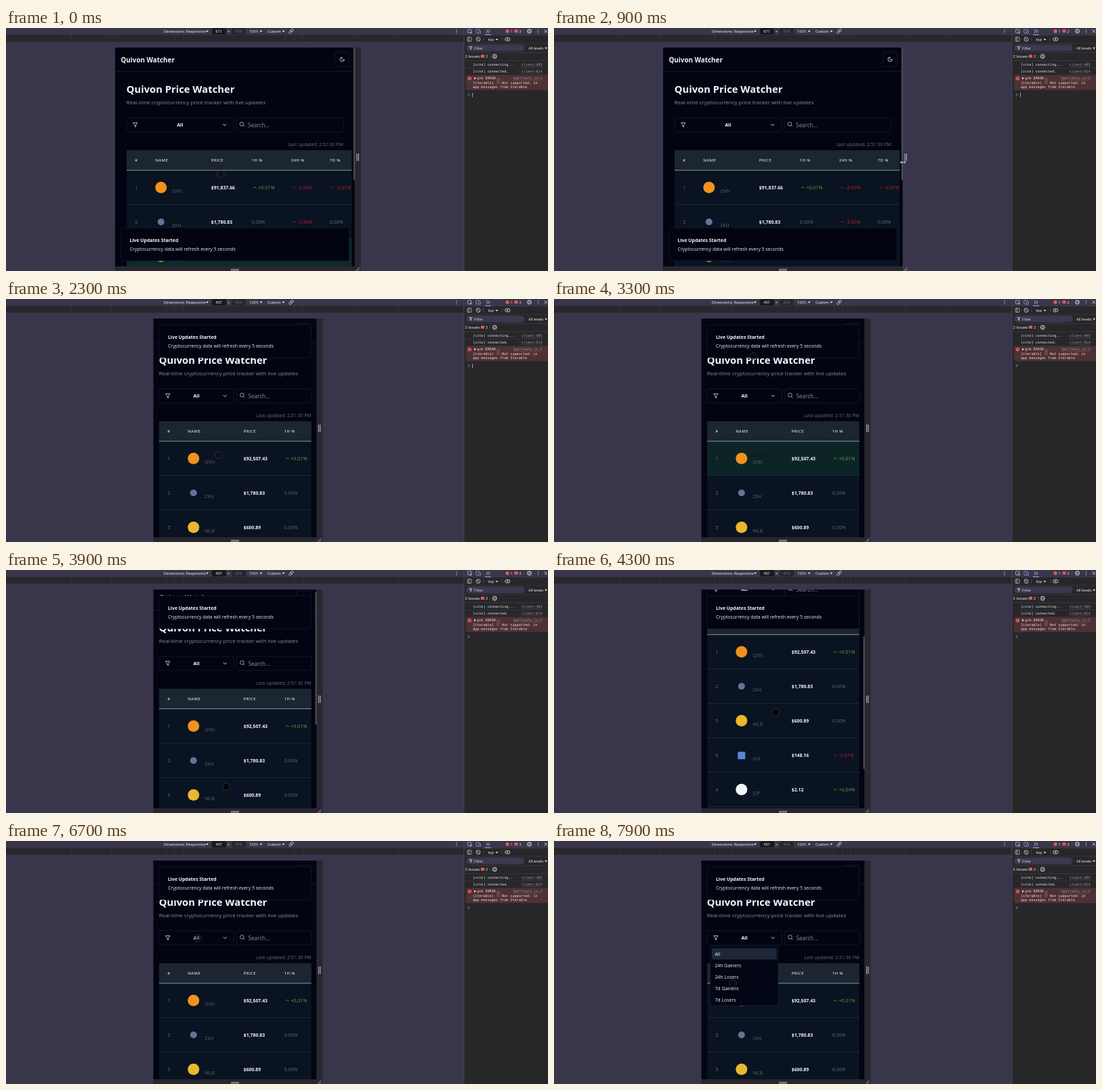
Write an HTML page with a canvas that moves like this. It is 800 by 360 pixels and loops after 8 s.

```html
<!DOCTYPE html>
<html lang="en">
<head>
<meta charset="utf-8">
<title>Responsive preview</title>
<style>
html, body { margin: 0; width: 100%; height: 100%; overflow: hidden; background: #39354a; }
canvas { display: block; width: 800px; height: 360px; }
</style>
</head>
<body>
<canvas id="stage"></canvas>
<script>
const LOOP = 8000, SCALE = 0.527, MID = 337.8, TOP = 29, BOTTOM = 353;
const SANS = '"Open Sans", "Noto Sans", sans-serif';
const MONO = '"DejaVu Sans Mono", "Noto Sans Mono", monospace';
const UI = 'Roboto, "Open Sans", sans-serif';
const GREEN = '#5fa632', RED = '#bd1b2a', DIM = '#626973', PAGE = '#020412';
const BAR = '#39354a', DARK = '#27272a';

const canvas = document.getElementById('stage');
const c = canvas.getContext('2d');
const dpr = window.devicePixelRatio || 1;
canvas.width = 800 * dpr;
canvas.height = 360 * dpr;

const moon = new Path2D('M12 3a6 6 0 0 0 9 9 9 9 0 1 1-9-9Z');

const coins = [
  { rank: 1, name: 'Qelvane', sym: 'QVN', price: '$91,837.66', color: '#f0921e', r: 8.5, pct: [0.01, -2.06, -0.01] },
  { rank: 2, name: 'Zorkhem', sym: 'ZKH', price: '$1,780.83', color: '#6d6f98', r: 5, pct: [0, -3, 0] },
  { rank: 5, name: 'WLB', sym: 'WLB', price: '$600.89', color: '#e8b92e', r: 8.5, pct: [0, -2.87, 0] },
  { rank: 6, name: 'Vulmera', sym: 'VUL', price: '$148.16', color: '#5b86d8', square: 11, pct: [-0.01, -1.94, 0] },
  { rank: 4, name: 'JQP', sym: 'JQP', price: '$2.12', color: '#f4f5f6', r: 8.5, pct: [0.04, -1.62, 0] },
  { rank: 3, name: 'Telbar', sym: 'TBR', price: '$1.00', color: '#2f9a80', r: 8.5, pct: [0, 0, 0] }
];
const columns = [['#', 12.5], ['NAME', 42.5], ['PRICE', 125], ['1H %', 185], ['24H %', 243], ['7D %', 300]];

const widthKeys = [[1000, 671], [1500, 565], [1800, 457]];
const scrollKeys = [[3850, 0], [4250, 115], [4600, 115], [5000, 0]];
const cursorKeys = [
  [0, 317, 216], [150, 317, 216], [900, 515, 199], [1000, 515, 199], [1500, 488, 202], [1800, 460, 203],
  [1900, 450, 206], [2300, 314, 231], [2700, 306, 214], [3300, 294, 85], [3850, 325, 326], [4250, 327, 211],
  [4600, 327, 211], [5000, 336, 326], [5400, 382, 118], [6100, 330, 135], [6600, 283, 144], [6900, 283, 144],
  [7500, 266, 200], [7900, 264, 211]
];

const clamp = v => Math.max(0, Math.min(1, v));
const smooth = p => p * p * (3 - 2 * p);
const dragging = t => t >= 850 && t < 1850;

function sample(keys, t, col = 1, ease = smooth) {
  if (t <= keys[0][0]) return keys[0][col];
  for (let i = 1; i < keys.length; i++) {
    const a = keys[i - 1], b = keys[i];
    if (t < b[0]) return a[col] + (b[col] - a[col]) * ease((t - a[0]) / (b[0] - a[0]));
  }
  return keys[keys.length - 1][col];
}

function pulse(t, start, peak, end) {
  return t < peak ? clamp((t - start) / (peak - start)) : clamp((end - t) / (end - peak));
}

function rect(x, y, w, h, color) {
  c.fillStyle = color;
  c.fillRect(x, y, w, h);
}

function box(x, y, w, h, r, fill, line) {
  c.beginPath();
  c.roundRect(x, y, w, h, r);
  if (fill) { c.fillStyle = fill; c.fill(); }
  if (line) { c.strokeStyle = line; c.lineWidth = 0.7; c.stroke(); }
}

function disc(x, y, r, fill, line, lw = 0.8) {
  c.beginPath();
  c.arc(x, y, r, 0, Math.PI * 2);
  if (fill) { c.fillStyle = fill; c.fill(); }
  if (line) { c.strokeStyle = line; c.lineWidth = lw; c.stroke(); }
}

function path(color, lw, ...pts) {
  c.beginPath();
  for (let i = 0; i < pts.length; i += 2) c.lineTo(pts[i], pts[i + 1]);
  c.strokeStyle = color;
  c.lineWidth = lw;
  c.stroke();
}

// y is the vertical centre of the capitals
function text(s, x, y, size, color, o = {}) {
  c.font = `${o.weight || 400} ${size}px ${o.font || SANS}`;
  c.textAlign = o.align || 'left';
  c.letterSpacing = (o.spacing || 0) + 'px';
  c.fillStyle = color;
  c.fillText(s, x, y + size * 0.357);
  c.letterSpacing = '0px';
}

function chevron(x, y, w, dir, color, lw = 0.9) {
  path(color, lw, x - w, y - dir * w / 2, x, y + dir * w / 2, x + w, y - dir * w / 2);
}

function caret(x, y, color) {
  c.beginPath();
  c.moveTo(x - 2, y - 1);
  c.lineTo(x + 2, y - 1);
  c.lineTo(x, y + 1.6);
  c.fillStyle = color;
  c.fill();
}

function funnel(x, y, s, color) {
  path(color, 0.8, x - s, y - s, x + s, y - s, x + s * 0.25, y + 0.1 * s, x + s * 0.25, y + s,
    x - s * 0.25, y + s * 0.7, x - s * 0.25, y + 0.1 * s, x - s, y - s);
}

function gear(x, y) {
  for (let i = 0; i < 8; i++) {
    const a = i * Math.PI / 4, u = Math.cos(a), v = Math.sin(a);
    path('#d5d5da', 1.1, x + u * 2.5, y + v * 2.5, x + u * 3.7, y + v * 3.7);
  }
  disc(x, y, 2.5, null, '#d5d5da', 0.9);
  disc(x, y, 0.8, '#d5d5da');
}

function dots(x, y) {
  for (const d of [-2.4, 0, 2.4]) disc(x, y + d, 0.65, '#d5d5da');
}

function percent(v, x, y) {
  const s = (v > 0 ? '+' : '') + v.toFixed(2) + '%';
  if (!v) return text(s, x, y, 7, DIM);
  const color = v > 0 ? GREEN : RED;
  chevron(x + 4.5, y - 0.5, 2.2, v > 0 ? -1 : 1, color);
  text(s, x + 9.5, y, 7.15, color);
}

function coinRow(coin, x, y, right, price, flash) {
  rect(x, y, right - x, 51, '#0a1321');
  if (flash) {
    rect(x, y, right - x, 51, `rgba(38,170,90,${0.15 * flash})`);
    text(coin.name, x + 67.5, y + 21, 6.95, '#0b1a20');
  }
  rect(x, y + 50.2, right - x, 0.8, '#1e2c3a');
  const mid = y + 25.8;
  text(coin.rank, x + 12.5, mid, 7.3, '#666d77');
  if (coin.square) rect(x + 51 - coin.square / 2, mid - coin.square / 2, coin.square, coin.square, coin.color);
  else disc(x + 51, mid - 0.5, coin.r, coin.color);
  text(coin.sym, x + 67.5, mid + 5.2, 7, '#59606a');
  text(price, x + 125, mid, 6.85, '#f6f8fa', { weight: 700 });
  coin.pct.forEach((v, i) => percent(v, x + columns[i + 3][1], mid));
}

function table(x, right, t) {
  c.save();
  c.beginPath();
  c.roundRect(x, 181, right - x, 400, [2, 2, 0, 0]);
  c.clip();
  rect(x, 181, right - x, 30, '#1b2631');
  for (const [label, dx] of columns) {
    text(label, x + dx, 196, 5.95, '#ced3d8', { weight: 600, spacing: 0.35 });
  }
  coins.forEach((coin, i) => {
    const price = i === 0 && t >= 2000 ? '$92,507.43' : coin.price;
    const flash = i === 0 ? pulse(t, 2850, 3150, 3800) : i === 2 ? pulse(t, -1, 0, 800) : 0;
    coinRow(coin, x, 211 + i * 51, right, price, flash);
  });
  rect(x, 210.4, right - x, 0.8, '#a9aeb4');
  c.restore();
}

function page(left, right, wide, t) {
  text('Quivon Watcher', left + 8.5, 47, 9.85, '#f5f7fa', { weight: 700 });
  box(right - 29, 36, 21, 21, 3, null, '#1a2231');
  c.save();
  c.translate(right - 22.8, 42.1);
  c.scale(0.36, 0.36);
  c.strokeStyle = '#e8ebef';
  c.lineWidth = 2.2;
  c.stroke(moon);
  c.restore();
  rect(left, 64, right - left, 0.8, '#151d2b');

  const pad = wide ? 16.8 : 8.4;
  const x = left + pad, end = right - pad + (wide ? 0 : 1);
  text('Quivon Price Watcher', x, 91, 14.75, '#f8fafc', { weight: 700 });
  text('Real-time cryptocurrency price tracker with live updates', x, 110.5, 7.94, '#8791a0');

  const half = (end - x - 4.2) / 2;
  box(x, 133, half, 21, 3, null, '#192130');
  funnel(x + 13, 143.5, 3.2, '#dfe3e8');
  text('All', x + half / 2, 143.7, 7.1, '#f5f7fa', { weight: 700, align: 'center' });
  chevron(x + half - 13, 143.5, 2.4, 1, '#d5d9df', 1);

  const sx = end - half;
  box(sx, 133, half, 21, 3, null, '#192130');
  disc(sx + 8, 142.3, 2.8, null, '#aeb4bc', 0.9);
  path('#aeb4bc', 0.9, sx + 10.1, 144.4, sx + 11.9, 146.2);
  text('Search...', sx + 17.2, 144, 8.1, '#8a93a0');

  text('Last updated: 2:51:30 PM', end, 172.5, 6.95, '#666d78', { align: 'right' });
  table(x, wide ? right - 4 : end, t);
}

function toast(left, right, y) {
  const x = left + 8.6;
  box(x, y, right - 8 - x, 49, 3, '#020511', '#161d2b');
  text('Live Updates Started', x + 13, y + 18.8, 6.9, '#f8fafc', { weight: 700 });
  text('Cryptocurrency data will refresh every 5 seconds', x + 13, y + 31.3, 6.93, '#eceef1');
}

function menu(x) {
  box(x, 156, 100, 88, 3, '#020614', '#1a2332');
  box(x + 2, 159, 96, 16.5, 2, '#1e283a');
  ['All', '24h Gainers', '24h Losers', '7d Gainers', '7d Losers'].forEach((s, i) => {
    text(s, x + 6.5, 167.6 + i * 16.9, 6.95, '#f3f5f7');
  });
}

function device(w, t) {
  const left = MID - w * SCALE / 2, right = MID + w * SCALE / 2;
  const wide = w >= 640, scroll = sample(scrollKeys, t);
  rect(left, BOTTOM, right - left, 360 - BOTTOM, '#28272f');
  if (!dragging(t)) rect(right, TOP, 9, 360 - TOP, '#28272f');
  c.save();
  c.beginPath();
  c.rect(left, TOP, right - left, BOTTOM - TOP);
  c.clip();
  rect(left, TOP, right - left + 1, BOTTOM - TOP, PAGE);
  c.save();
  c.translate(0, -scroll);
  page(left, right, wide, t);
  c.restore();
  toast(left, right, wide ? 296 : 38);
  if (t >= 6750) menu(left + 13.5);
  c.restore();

  if (t < 1000 || (t > 3850 && t < 5300)) {
    box(right - 1.8, TOP + scroll * 0.6, 2.4, 197, 1.2, '#4b4b52');
  }
  for (const d of [0, 2.4]) {
    rect(right + 2.8 + d, 186, 1.1, 11, '#b4b4ba');
    rect(332, 357 + d * 0.9, 12, 1, '#b4b4ba');
  }
  path('#b4b4ba', 0.9, right + 2, 359.5, right + 7, 354.5);
  path('#b4b4ba', 0.9, right + 4.7, 359.5, right + 7, 357.2);
}

function toolbar(w) {
  const ink = '#e6e4ee', o = { font: UI }, mid = { font: UI, align: 'center' };
  rect(0, 0, 676, 360, BAR);
  rect(0, 10.4, 676, 9.8, '#28272b');
  for (const d of [75.5, 88.5, 100.5, 181.5, 241.5]) {
    for (const s of [-1, 1]) rect(337.5 + s * d - 0.4, 11, 0.8, 9, '#3a3942');
  }
  text('Dimensions: Responsive', 233, 4.7, 5.7, ink, o);
  caret(297, 4.7, ink);
  box(304, 0.2, 21, 9.2, 1.5, '#19181d');
  text(Math.round(w), 314, 4.7, 5.7, '#f2f1f6', mid);
  text('×', 328.5, 4.7, 5.7, ink, mid);
  box(333, 0.2, 21, 9.2, 1.5, '#28272c');
  text('616', 343.5, 4.7, 5.7, '#7c7983', mid);
  text('100%', 359, 4.7, 5.7, ink, o);
  caret(376.5, 4.7, ink);
  text('Custom', 386, 4.7, 5.7, ink, o);
  caret(409.5, 4.7, ink);
  c.save();
  c.translate(421, 4.7);
  c.rotate(-0.8);
  box(-4, -1.6, 4.4, 3.2, 1.5, null, ink);
  box(-0.4, -1.6, 4.4, 3.2, 1.5, null, ink);
  c.restore();
  dots(665, 4.7);
}

function badge(x, y, n, round) {
  if (round) disc(x, y, 2.7, '#e0595b');
  else box(x - 2.6, y - 2.5, 5.2, 4.6, 1, '#e0595b');
  text(n, x + 4.5, y, 5.7, '#e2e2e6', { font: UI });
}

function consoleLine(s, y, src, color = '#e3e3e6') {
  text(s, 689, y, 5.12, color, { font: MONO });
  if (!src) return;
  text(src, 791.5, y, 5.12, '#9a9aa2', { font: MONO, align: 'right' });
  rect(791.5 - src.length * 3.08, y + 2.8, src.length * 3.08, 0.3, '#77777e');
}

function devtools(t) {
  const ink = '#d5d5da', blue = '#8ab0f5', o = { font: UI };
  rect(676, 0, 124, 360, DARK);
  rect(676, 0, 124, 10.4, BAR);
  rect(675.5, 0, 0.8, 360, '#4c4a57');
  for (const y of [10.4, 22.6, 36, 48]) rect(676, y, 124, 0.5, '#454350');

  box(681.5, 2, 5.4, 5.4, 1, null, ink);
  path(ink, 1, 687.5, 8, 684.5, 5);
  box(693.8, 2, 5, 5.5, 0.8, null, blue);
  box(697.5, 4, 3, 4, 0.6, BAR, blue);
  for (const x of [709, 712]) path(ink, 0.9, x, 2.4, x + 2.1, 4.7, x, 7);
  rect(707, 9.4, 9, 1.1, blue);
  badge(740, 4.7, '1', true);
  badge(753, 4.7, '2');
  rect(764, 2, 0.6, 6, '#55535e');
  gear(772.5, 4.7);
  dots(785.5, 4.7);
  path(ink, 0.9, 794.5, 2.5, 798.9, 6.9);
  path(ink, 0.9, 798.9, 2.5, 794.5, 6.9);

  box(681, 13.7, 6, 6, 0.8, null, ink);
  rect(682.8, 13.7, 0.8, 6, ink);
  disc(697, 16.7, 3, null, ink);
  path(ink, 0.9, 694.9, 14.6, 699.1, 18.8);
  rect(704.5, 13.5, 0.6, 6.5, '#55535e');
  text('top', 711.5, 16.9, 5.8, '#e6e6ea', o);
  caret(724.5, 17, ink);
  rect(732, 13.5, 0.6, 6.5, '#55535e');
  c.beginPath();
  c.ellipse(740.3, 16.7, 3.8, 2.5, 0, 0, Math.PI * 2);
  c.strokeStyle = ink;
  c.lineWidth = 0.9;
  c.stroke();
  disc(740.3, 16.7, 1.1, ink);

  box(679, 24.6, 86.5, 9.8, 4.9, '#3b3850');
  funnel(686, 29.6, 2, ink);
  text('Filter', 691, 29.7, 5.8, '#c9c8d0', o);
  text('All levels', 771, 29.7, 5.7, '#e6e6ea', o);
  caret(797, 29.8, ink);

  text('2 Issues:', 677.5, 42, 5.8, '#e6e6ea', o);
  badge(703.5, 42, '2');
  rect(714, 39, 0.6, 6, '#55535e');
  gear(721.2, 42);

  consoleLine('[vite] connecting...', 54.2, 'client:495');
  rect(676, 59.3, 124, 0.5, '#3c3c42');
  consoleLine('[vite] connected.', 64.4, 'client:614');
  box(679, 69.6, 124, 22.4, 2, '#4e3135');
  disc(684.3, 74.7, 2.7, '#e0595b');
  path('#4e3135', 0.6, 683.3, 73.7, 685.3, 75.7);
  path('#4e3135', 0.6, 685.3, 73.7, 683.3, 75.7);
  rect(724, 74, 5, 9, '#62474b');
  consoleLine('  grm ERROR', 74.4, 'Spellowly.js:2', '#f3dcdc');
  c.beginPath();
  c.moveTo(691, 72.4);
  c.lineTo(694, 74.4);
  c.lineTo(691, 76.4);
  c.fillStyle = ink;
  c.fill();
  consoleLine('[iterable]    Not supported: in', 81, '', '#f3dcdc');
  consoleLine('app messages from Iterable', 87.6, '', '#f3dcdc');
  path('#9aa8c4', 0.9, 682, 96.8, 684, 98.8, 682, 100.8);
  if (t < 2800) rect(688, 96, 0.7, 6.5, '#d8d8dc');
}

function pointer(t) {
  const ease = t >= 1000 && t < 1800 ? p => p : smooth;
  const x = sample(cursorKeys, t, 1, ease), y = sample(cursorKeys, t, 2, ease);
  if (dragging(t)) {
    path('#f4f4f6', 0.9, x - 3.6, y, x + 3.6, y);
    for (const s of [-1, 1]) path('#f4f4f6', 0.9, x + s * 2.2, y - 1.6, x + s * 3.8, y, x + s * 2.2, y + 1.6);
    return;
  }
  const pressed = t > 3850 && t < 5000;
  disc(x, y, 5.3, pressed ? 'rgba(4,4,6,.9)' : 'rgba(14,14,16,.45)', 'rgba(88,88,92,.6)', 0.8);
}

function draw(now) {
  const t = now % LOOP;
  const w = sample(widthKeys, t, 1, p => p);
  c.setTransform(dpr, 0, 0, dpr, 0, 0);
  c.textBaseline = 'alphabetic';
  toolbar(w);
  device(w, t);
  devtools(t);
  pointer(t);
}

const start = performance.now();
function frame() {
  draw(performance.now() - start);
  requestAnimationFrame(frame);
}
frame();
</script>
</body>
</html>
```
